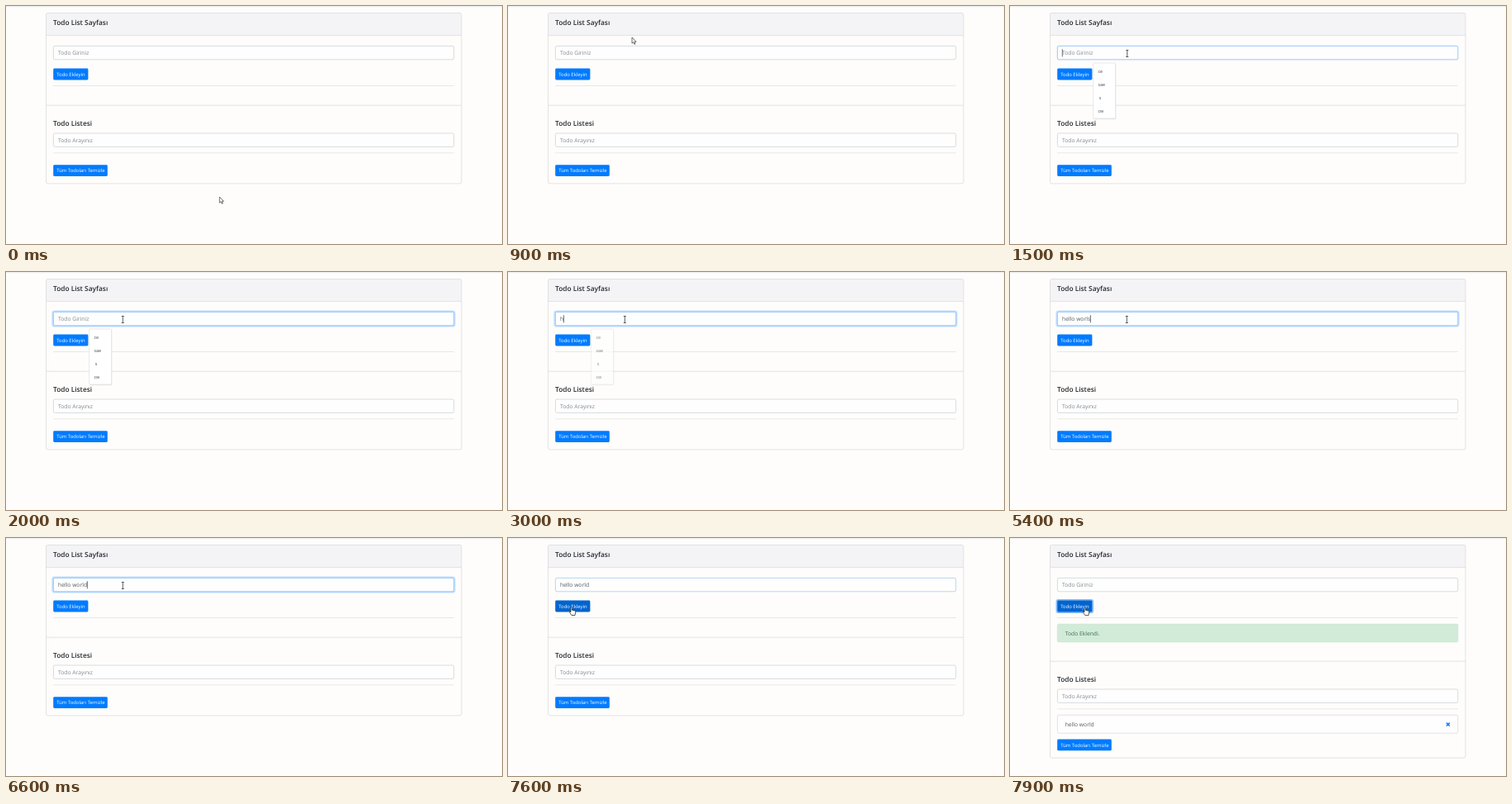
An HTML page that plays this animation: 600x288 px, repeating every 8 s.

```html
<!DOCTYPE html>
<html lang="tr">
<head>
<meta charset="utf-8">
<title>Todo List</title>
<style>
html, body { margin: 0; width: 600px; height: 288px; overflow: hidden; background: #fefdfc; }
svg { display: block; }
text { font: 6.74px "Open Sans", "Noto Sans", sans-serif; fill: #55595e; white-space: pre; text-rendering: geometricPrecision; }
.head { font-size: 8.35px; font-weight: 600; fill: #25292e; }
.hint { fill: #82878d; }
.label { font-size: 5.93px; fill: #fff; }
.line { stroke: #e4e4e5; stroke-width: .8; }
.card { fill: none; stroke: #dcdcdd; stroke-width: .8; }
.field { fill: #fefefe; stroke: #cfd4d9; stroke-width: .8; }
.btn { fill: #007bff; }
.menu text { font-size: 5.4px; fill: #45484c; }
</style>
</head>
<body>
<svg width="600" height="288" viewBox="0 0 600 288">
  <rect width="600" height="288" fill="#fefdfc"/>
  <path class="line" d="M0 .7H600"/>
  <path d="M48.5 35.5V10.5a2 2 0 0 1 2-2H549a2 2 0 0 1 2 2V35.5z" fill="#f4f4f7"/>
  <path class="line" d="M48.5 35.6H551" style="stroke:#dcdcdd"/>
  <rect id="card" class="card" x="48.5" y="8.5" width="502.5" height="206.4" rx="2"/>
  <text class="head" x="57" y="23">Todo List Sayfası</text>

  <rect id="glow" x="56.4" y="47.4" width="486.2" height="18.2" rx="2.4" fill="none" stroke="#bfdeff" stroke-width="2"/>
  <rect id="entry" class="field" x="57.4" y="48.4" width="484.4" height="16.4" rx="1.8"/>
  <text id="hint" class="hint" x="63" y="59.4">Todo Giriniz</text>
  <text id="typed" x="63" y="59.4"></text>
  <path id="caret" d="M0 52.2V61.4" stroke="#33373b" stroke-width=".7"/>

  <rect id="ring" x="56.4" y="74.8" width="43.8" height="15.4" rx="2.2" fill="none" stroke="#86bdfb" stroke-width="1.8"/>
  <rect id="add" class="btn" x="57.2" y="75.6" width="42.2" height="13.8" rx="1.4"/>
  <text class="label" x="61.2" y="84.9">Todo Ekleyin</text>
  <path class="line" d="M57 96.5H542"/>

  <g id="alert">
    <rect x="57.3" y="104" width="484.6" height="22" rx="1.8" fill="#d2ebd9" stroke="#c6e4cf" stroke-width=".6"/>
    <text x="66.7" y="117.5" style="fill:#3c6e4b">Todo Eklendi.</text>
  </g>

  <g id="list">
    <path class="line" d="M48.5 120.2H551" style="stroke:#dcdcdd"/>
    <text class="head" x="57" y="145">Todo Listesi</text>
    <rect class="field" x="57.4" y="154" width="484.4" height="16.4" rx="1.8"/>
    <text class="hint" x="63" y="164.8">Todo Arayınız</text>
    <path class="line" d="M57 177.8H542"/>
  </g>

  <g id="item">
    <rect x="57.4" y="214.2" width="484.4" height="22" rx="1.8" fill="#fefefe" stroke="#dcdcdd" stroke-width=".8"/>
    <text x="66.7" y="228">hello world</text>
    <path d="M528 223.7l3.8 3.8m0-3.8l-3.8 3.8" stroke="#1580f5" stroke-width="1.7"/>
  </g>

  <g id="clear">
    <rect class="btn" x="57.2" y="192.2" width="65.6" height="13.7" rx="1.4"/>
    <text class="label" x="61.2" y="201.4">Tüm Todoları Temizle</text>
  </g>

  <g id="menu" class="menu">
    <rect x="101" y="69.6" width="27.3" height="67.6" rx="1" fill="#000" opacity=".08"/>
    <rect x="100.6" y="69" width="27" height="67" rx="1" fill="#fff" stroke="#dadada" stroke-width=".6"/>
    <text x="106.4" y="80.6">ce</text>
    <text x="106.4" y="96.6">sae</text>
    <text x="107.8" y="112.6">s</text>
    <text x="106.4" y="128.6">cw</text>
  </g>

  <path id="arrow" d="M0 0V7.2L1.7 5.7 2.9 8.3 4 7.8 2.9 5.3H5.1z" fill="#fff" stroke="#333" stroke-width=".7"/>
  <path id="beam" d="M-1.5-4H1.5M0-4V4M-1.5 4H1.5" fill="none" stroke="#333" stroke-width=".8"/>
  <path id="hand" d="M-.8 4.9V.6Q-.8-.3 0-.3T.8.6V3.4L3.9 4.1Q5 4.5 4.9 5.8L4.2 9.7H.2L-2.2 6.4Q-2.4 5-.8 5.6z" fill="#fff" stroke="#222" stroke-width=".75"/>
</svg>
<script>
const LOOP = 8000, STEP = 100;
const FOCUS = 1460, BLUR = 7600, ADDED = 7700;
const $ = id => document.getElementById(id);
const show = (id, on) => { $(id).style.display = on ? "" : "none"; };
const shift = (id, x, y) => $(id).setAttribute("transform", `translate(${x} ${y})`);

const typing = [
  [FOCUS, ""], [3000, "h"], [3200, "he"], [3400, "hel"], [3500, "hell"], [3700, "hello"],
  [4000, "hello "], [4500, "hello w"], [4600, "hello wo"], [5000, "hello wor"],
  [5100, "hello worl"], [5400, "hello worls"], [6500, "hello worl"], [6600, "hello world"]
];

// time, x, y of the pointer
const path = [
  [0, 258.3, 231], [200, 258.3, 231], [400, 290, 210], [600, 322, 150], [800, 215, 70],
  [900, 150, 38], [1000, 135, 45], [1100, 142, 53.5], [1300, 141.8, 57.5], [1600, 141.8, 57.5],
  [1700, 141.3, 57.5], [7000, 141.3, 57.5], [7200, 128, 66], [7400, 88, 80],
  [7600, 76.8, 83.8], [7700, 79, 84], [7900, 90.8, 84]
];

function pointer(t) {
  const i = path.findIndex(p => p[0] > t);
  if (i < 0) return path[path.length - 1].slice(1);
  const [t0, x0, y0] = path[i - 1], [t1, x1, y1] = path[i];
  const u = (t - t0) / (t1 - t0), k = u * u * (3 - 2 * u);
  return [x0 + (x1 - x0) * k, y0 + (y1 - y0) * k];
}

function draw(t) {
  const added = t >= ADDED;
  const focused = t >= FOCUS && t < BLUR;
  const [keyed, text] = typing.filter(k => k[0] <= t).pop() || [0, ""];

  // entry field
  const typed = $("typed");
  typed.textContent = added ? "" : text;
  show("hint", added || !text);
  show("caret", focused && Math.floor((t - keyed) / 520) % 2 === 0);
  shift("caret", 63.3 + (text ? typed.getComputedTextLength() : 0), 0);
  $("glow").style.opacity = focused ? Math.min(1, (t - 1480) / 200) : 0;
  $("entry").style.stroke = focused ? "#86bdf8" : t >= BLUR && !added ? "#a5cdee" : "";

  // suggestions
  show("menu", t >= FOCUS && t < 3200);
  $("menu").style.opacity = t < 3000 ? 1 : t < 3100 ? .65 : .25;

  // pointer
  const [x, y] = pointer(t);
  const inField = x > 57 && x < 542 && (y > 48 && y < 65 || y > 154 && y < 170.5);
  const onAdd = x > 57 && x < 99.5 && y > 75.5 && y < 89.5;
  const kind = inField ? "beam" : onAdd ? "hand" : "arrow";
  for (const id of ["arrow", "beam", "hand"]) show(id, id === kind);
  shift(kind, x, y);
  $("add").style.fill = onAdd ? "#0064cf" : "";
  show("ring", added);

  // list below
  show("alert", added);
  show("item", added);
  shift("list", 0, added ? 29 : 0);
  shift("clear", 0, added ? 51.4 : 0);
  $("card").setAttribute("height", added ? 257.6 : 206.4);
}

const start = performance.now();
function tick() {
  const t = (performance.now() - start) % LOOP;
  draw(Math.floor(t / STEP) * STEP);
  requestAnimationFrame(tick);
}
tick();
</script>
</body>
</html>
```
